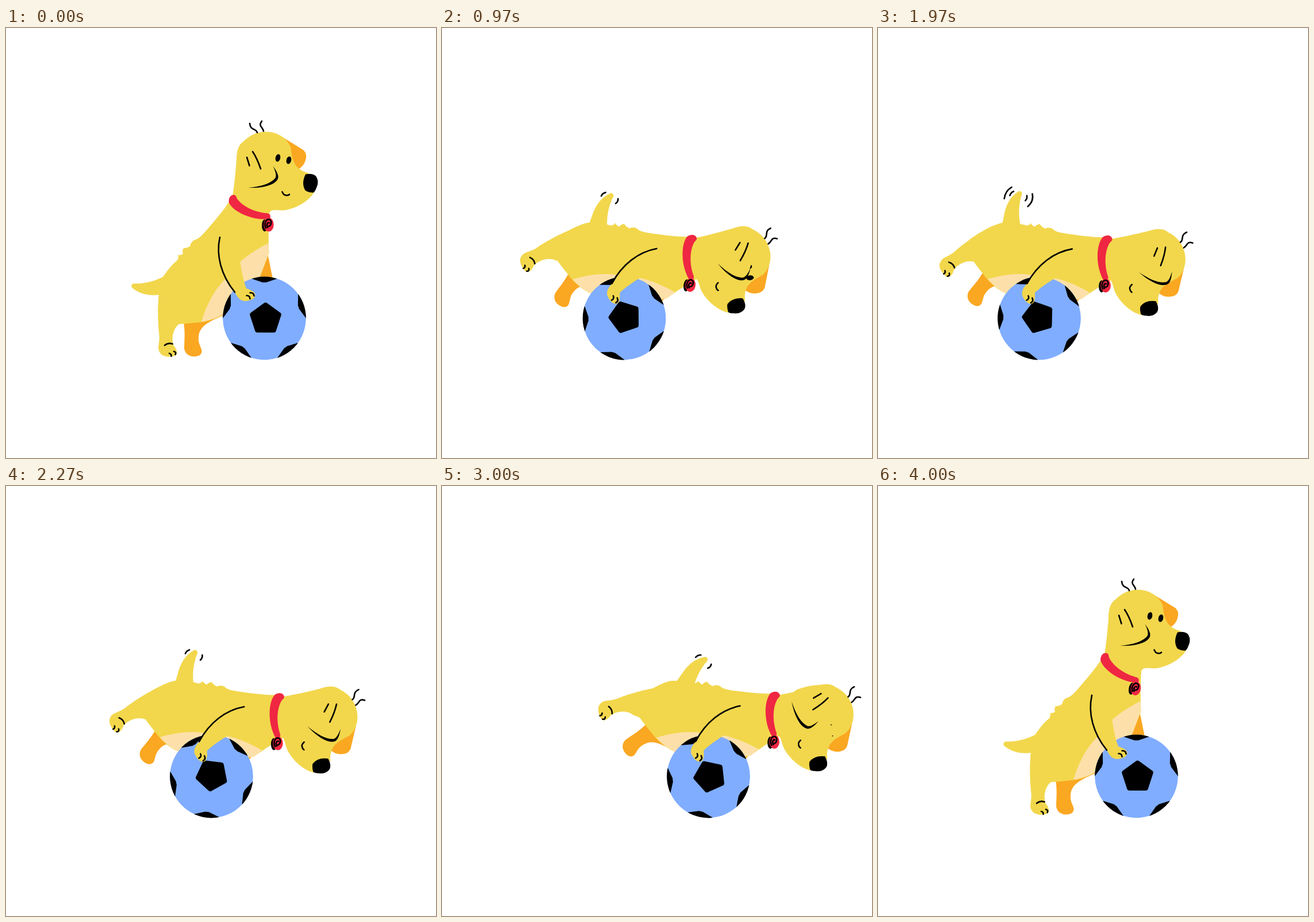
These frames come from a looping animation (748 by 748 pixels, 4030 ms). An HTML page:

```html
<!DOCTYPE html>
<html lang="en">
<head>
<meta charset="utf-8">
<title>Puppy on a ball</title>
<style>
  html, body { margin: 0; width: 100%; height: 100%; overflow: hidden; background: #fff; }
  svg { display: block; width: 100vw; height: 100vh; }
  .fur { fill: #f2d74c; }
  .far { fill: #faa722; }
  .cream { fill: #fde0a9; }
  .red { fill: #ef2742; }
  .line { fill: none; stroke: #000; stroke-width: 2.6; stroke-linecap: round; stroke-linejoin: round; }
</style>
</head>
<body>
<svg viewBox="0 0 748 748">
  <defs>
    <clipPath id="disc"><circle r="72.4"/></clipPath>
  </defs>
  <!-- data-at is the joint a bone turns about -->
  <g id="stage">
    <g data-bone="body" data-at="418 492">
      <path class="far" data-bone="farLeg" data-at="305 468" d="M306 466L309 512C312 530 310 545 310 558Q313 571 327 571.5Q341 571 340.5 561C339 554 334 549 335 538C336 522 346 513 378 500L350 470Z"/>
      <path class="far" d="M452 380C456 394 459 412 464 436L448 460L434 440Z"/>
      <g data-bone="tail" data-at="305 441">
        <path class="fur" d="M306 424C288 425 280 430 273 433C255 442 238 445 222 444.500Q216 447 219.500 452C234 464 250 466 268 464L306 461Z"/>
        <g id="wagIn" class="line">
          <path d="M230.500 464Q225 464 221.700 459.700"/>
          <path d="M231.600 435.700Q227 433 222.400 435.600"/>
        </g>
        <g id="wagOut" class="line">
          <path d="M238.400 471.800Q225 474 215.600 465"/>
          <path d="M240 428.700Q228 421 216.700 427.300"/>
        </g>
      </g>
      <g data-bone="nearLeg" data-at="271 469">
        <path class="fur" d="M268 452C263 475 264 510 266 530C268 542 265 550 265 558Q267 570 279 571.500Q294 573 297 567Q298 559 292 553C287 542 290 523 301 515L312 500L302 456Z"/>
        <path class="line" d="M276 552Q282 547 289.500 549.500M284 566Q288 567 287.500 571M292 562.500Q297 564 294.500 568"/>
      </g>
      <path class="fur" d="M390 299C383 311 370 328 345 356C337 365 332 368 327 369Q321 373 320.500 379Q316 383 309 383Q306 387 308 393Q302 396 299 395Q301 400 298 404C288 412 280 423 273 433C267 445 264 470 265 500L274 514C285 517 320 514 345 511Q364 507 378 498L442 432L457.500 392C456 370 457 345 458 322L430 302Z"/>
      <path class="cream" d="M340 511C350 478 364 453 383 435C398 412 420 393 456 374.500L457.500 391L442 432L378 498Q360 508 340 511Z"/>
      <g data-bone="head" data-at="403 309">
        <path class="far" d="M483 191L517 212Q524 218 521.500 228Q519 240 508 246L488 232Z"/>
        <path class="fur" d="M392 304C396 284 399 255 401 230C401 214 404 203 414 196.500C424 187 436 180.500 451 180.500C470 180 488 190 495 207C497 222 499 236 509 244Q516 250 526 252L537 284C528 301 507 312 490 316C477 319 468 315 461 318Q457 321 457 328L420 322Z"/>
        <path d="M521 254.500Q535 252 540 259Q545 268 540 278Q537 286 534 286.500Q526 286 521 283Q513 271 521 254.500Z"/>
        <g transform="translate(473 226)"><ellipse class="eye" rx="4.2" ry="6.6"/></g>
        <g transform="translate(492 230)"><ellipse class="eye" rx="4.2" ry="6.6"/></g>
        <path class="line" d="M480.500 285Q483 291 487 291Q491 291.500 493 289.500"/>
        <path class="line" d="M437 182C435 174 425 179 424 166M448 179.500C447 172 438 171 445 162"/>
        <g data-bone="ear" data-at="423 198">
          <path class="fur" d="M407 210C414 192 442 202 464 241C474 255 474 266 460 271C446 277 432 279 422 278.500Q408 277 403 266C400 250 401 227 407 210Z"/>
          <path d="M464.500 240C471 249 475 257 473 262C469 272 450 279 421 278C446 275.500 461 270 468.500 261C471 256 468.500 249 464.500 240Z"/>
          <path class="line" d="M419 225L423.500 239.500M429 215Q437 227 443 245"/>
        </g>
      </g>
      <g data-bone="collar" data-at="394 298">
        <path class="red" d="M388 304C386 294 393 288 399 291Q401 294 402 297C412 311 434 321 456 322.500Q462 325 459 332C430 336 395 320 388 304Z"/>
        <g data-bone="tag" data-at="455 329">
          <ellipse cx="450" cy="343.500" rx="5" ry="10.500"/>
          <ellipse class="red" cx="457" cy="342" rx="8.800" ry="12"/>
          <path class="line" d="M452 348C448 339 453 332 458 333C463 335 462 344 456.500 345M455 347C452 341 456 337 458 339"/>
        </g>
      </g>
    </g>
    <g transform="translate(449.5 505)">
      <g id="ball" clip-path="url(#disc)">
        <circle r="72.4" fill="#80adff"/>
      </g>
    </g>
    <g data-bone="body" data-at="418 492">
      <g data-bone="arm" data-at="400 381">
        <path class="fur" d="M372 364C366 395 375 430 398 460L403 468Q410 477 420 474.500Q434 472 433.500 463Q431 457 418 453C413 440 410 425 407 405L400 368Z"/>
        <path class="line" d="M372 364C365 395 374 430 398 459.500M418.500 465.500Q424 465 424.500 471M424.500 460.500Q431 460 431.500 466"/>
      </g>
    </g>
  </g>
</svg>
<script>
const LOOP = 4030;
const $ = id => document.getElementById(id);
const $$ = sel => [...document.querySelectorAll(sel)];

const span = (t, from, to) => Math.min(1, Math.max(0, (t - from) / (to - from)));
const ease = (t, from, to) => (1 - Math.cos(Math.PI * span(t, from, to))) / 2;
const easeOut = (t, from, to) => 1 - (1 - span(t, from, to)) ** 5;

// Everything at time t: ball travel, and each bone's angle relative to its parent.
function pose(t) {
  const home = easeOut(t, 3010, 3990);                       // getting back up
  const lie = ease(t, 20, 370) - home;                       // stretched over the ball
  const droop = ease(t, 370, 1150);                          // head and collar sag
  const reach = ease(t, 370, 1400) - ease(t, 2000, 2950);    // hind end trails behind
  const push = ease(t, 2400, 2950);                          // preparing to get up
  return {
    slide: -248 * ease(t, 460, 1440) + 262 * ease(t, 1390, 2960) - 14 * home,
    roll: -207 * ease(t, 520, 1500) + 183 * ease(t, 1500, 2900) + 24 * home,
    eyes: 1 - 0.82 * (ease(t, 970, 1250) - ease(t, 3050, 3350)),
    angle: {
      body: lie * (56 + 1.2 * reach),
      farLeg: lie * (18 * (droop + push) - 38),
      nearLeg: lie * (19 - 21 * reach),
      tail: lie * (74 - 25 * reach),
      arm: lie * 10.5,
      head: lie * (15.5 * droop - 1),
      ear: lie * (6.5 * push - 32 * reach),
      collar: 10 * droop,
      tag: lie * -67 * droop
    }
  };
}

function addPolygon(points, attrs = {}) {
  const p = document.createElementNS('http://www.w3.org/2000/svg', 'polygon');
  p.setAttribute('points', points.join(' '));
  for (const k in attrs) p.setAttribute(k, attrs[k]);
  $('ball').append(p);
}
const polar = (r, deg) => {
  const a = deg * Math.PI / 180;
  return [r * Math.cos(a), r * Math.sin(a)];
};
const corners = Array.from({ length: 5 }, (_, i) => i * 72 - 90);
addPolygon(corners.map(a => polar(24.5, a)), {
  transform: 'translate(2 1)', stroke: '#000', 'stroke-width': 8, 'stroke-linejoin': 'round'
});
for (const a of corners) {
  addPolygon([polar(72.5, a - 18), polar(62.5, a - 3), polar(62.5, a + 3), polar(72.5, a + 18), polar(85, a)]);
}

const limbs = $$('[data-bone]');
const eyes = $$('.eye');
const show = (id, on) => $(id).setAttribute('visibility', on ? 'visible' : 'hidden');

function draw(t) {
  const now = pose(t);
  $('stage').setAttribute('transform', `translate(${now.slide} 0)`);
  $('ball').setAttribute('transform', `rotate(${now.roll})`);
  for (const el of limbs) {
    el.setAttribute('transform', `rotate(${now.angle[el.dataset.bone]} ${el.dataset.at})`);
  }
  for (const eye of eyes) eye.setAttribute('transform', `rotate(13) scale(${now.eyes})`);
  const wagging = t > 240 && t < 3120, beat = t % 400;
  show('wagIn', wagging && beat >= 100);
  show('wagOut', wagging && beat >= 300);
}

const start = performance.now();
function tick() {
  draw((performance.now() - start) % LOOP);
  requestAnimationFrame(tick);
}
tick();
</script>
</body>
</html>
```
